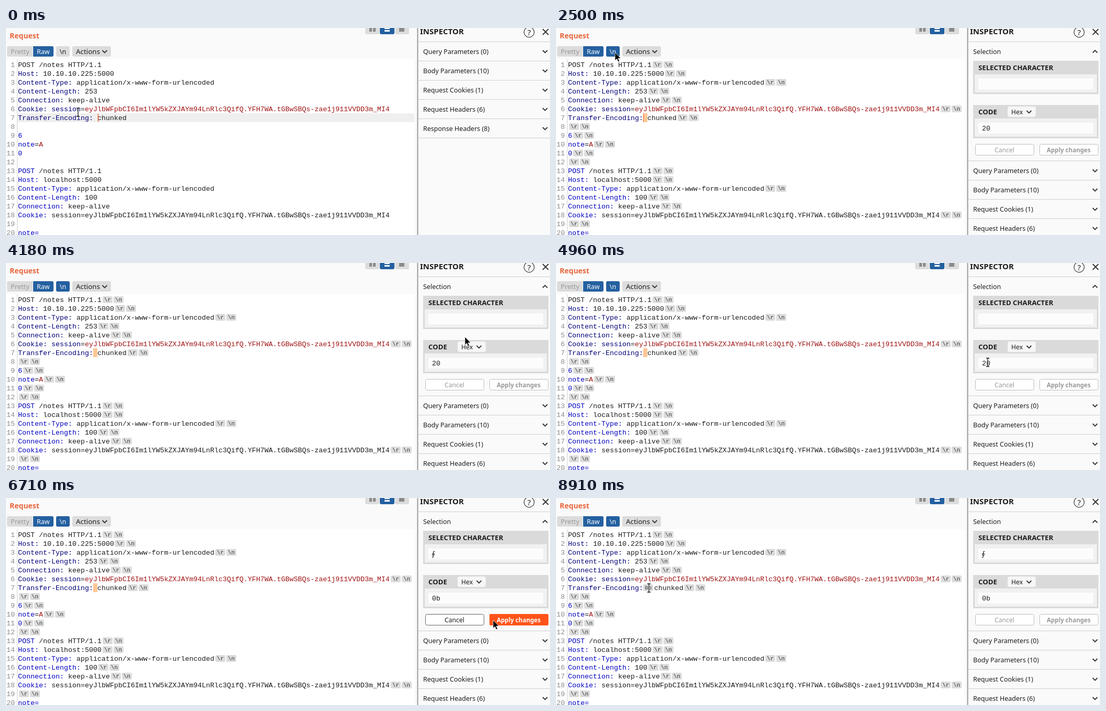
Write an HTML page that moves like this. It is 1042x398 px and loops after 9.01 s.

```html
<!DOCTYPE html>
<html lang="en">
<head>
<meta charset="utf-8">
<title>Request editor</title>
<style>
html, body { margin: 0; width: 100%; height: 100%; overflow: hidden; background: #fafafa; }
svg { display: block; width: 100vw; height: 100vh; }
text { font: 12.5px "Noto Sans", "Open Sans", sans-serif; fill: #1c1c1c; white-space: pre; }
.code text, .mono { font: 13.333px "Liberation Mono", "DejaVu Sans Mono", monospace; }
.code .num { fill: #8c8c8c; text-anchor: end; }
.code .tag { font-size: 11px; fill: #333; }
.code .head { fill: #000078; }
.code .body { fill: #0000c0; }
.code .value { fill: #a01414; }
.title { font-size: 14px; font-weight: 700; fill: #e8663c; }
.bold { font-weight: 700; font-size: 13.2px; }
.mid { text-anchor: middle; }
.chip { fill: #dcdcdc; }
.blue { fill: #2460a0; }
.white { fill: #fff; }
.dim { fill: #999; }
.small { font-size: 11.6px; font-weight: 700; }
.line { stroke: #cfcfcf; fill: none; }
.chev { fill: none; stroke: #333; stroke-width: 1.8; }

/* Hard switches: each keyframe holds until the next one */
.t { animation: 9.01s step-end infinite; }
@keyframes plain { 0% { opacity: 1 } 24.42%, 100% { opacity: 0 } }
@keyframes marked { 0% { opacity: 0 } 24.42%, 100% { opacity: 1 } }
@keyframes drop { 0% { transform: none } 24.42%, 100% { transform: translateY(229px) } }
@keyframes caret { 0% { opacity: 1 } 5.5%, 100% { opacity: 0 } }
@keyframes picked { 0% { opacity: 0 } 24.42% { opacity: 1 } 77.69%, 100% { opacity: 0 } }
@keyframes pickCaret { 0% { opacity: 0 } 24.42% { opacity: 1 } 29.9% { opacity: 0 } 33.8% { opacity: 1 } 39.4%, 100% { opacity: 0 } }
@keyframes tip { 0% { opacity: 0 } 32.19% { opacity: 1 } 37.18%, 100% { opacity: 0 } }
@keyframes oldCode { 0% { opacity: 1 } 57.7%, 100% { opacity: 0 } }
@keyframes firstKey { 0% { opacity: 0 } 57.7%, 100% { opacity: 1 } }
@keyframes secondKey { 0% { opacity: 0 } 59.93%, 100% { opacity: 1 } }
@keyframes fieldCaret { 0% { opacity: 0 } 59.93% { opacity: 1 } 65.15% { opacity: 0 } 69.9% { opacity: 1 } 73.8%, 100% { opacity: 0 } }
@keyframes enabled { 0% { opacity: 0 } 57.7% { opacity: 1 } 77.69%, 100% { opacity: 0 } }
@keyframes disabled { 0% { opacity: 1 } 57.7% { opacity: 0 } 77.69%, 100% { opacity: 1 } }
@keyframes hover { 0% { opacity: 0 } 70% { opacity: 1 } 77.69%, 100% { opacity: 0 } }
@keyframes applied { 0% { opacity: 0 } 77.69%, 100% { opacity: 1 } }
@keyframes push { 0% { transform: none } 77.69%, 100% { transform: translateX(13px) } }
@keyframes arrow { 0% { opacity: 0 } 12.2% { opacity: 1 } 52.9% { opacity: 0 } 61.5% { opacity: 1 } 82.6%, 100% { opacity: 0 } }
@keyframes beam { 0% { opacity: 1 } 12.2% { opacity: 0 } 52.9% { opacity: 1 } 61.5% { opacity: 0 } 82.6%, 100% { opacity: 1 } }

/* Pointer path, sampled about ten times a second */
.pointer { animation: path 9.01s steps(1) infinite; }
@keyframes path {
  0% { transform: translate(138px, 162px); animation-timing-function: steps(10) }
  11.1% { transform: translate(124px, 81px) }
  12.2% { transform: translate(122px, 63px); animation-timing-function: steps(7) }
  19.97% { transform: translate(118px, 47px); animation-timing-function: steps(2) }
  22.2% { transform: translate(113px, 47px) }
  33.84% { transform: translate(109px, 46px) }
  34.95% { transform: translate(254px, 41px); animation-timing-function: steps(3) }
  38.28% { transform: translate(880px, 72px) }
  39.4% { transform: translate(985px, 98px) }
  40.5% { transform: translate(1026px, 115px); animation-timing-function: steps(2) }
  43.05% { transform: translate(985px, 135px) }
  44.17% { transform: translate(938px, 141px); animation-timing-function: steps(2) }
  46.38% { transform: translate(879px, 142px); animation-timing-function: steps(7) }
  54.1% { transform: translate(827px, 191px) }
  60.9% { transform: translate(836px, 198px) }
  61.8% { transform: translate(870px, 217px) }
  62.9% { transform: translate(881px, 227px) }
  64% { transform: translate(889px, 234px) }
  65.1% { transform: translate(895px, 240px); animation-timing-function: steps(4) }
  69.9% { transform: translate(926px, 243px); animation-timing-function: steps(4) }
  74.4% { transform: translate(933px, 235px) }
  79.9% { transform: translate(925px, 236px); animation-timing-function: steps(4) }
  84.5% { transform: translate(510px, 230px) }
  85.65% { transform: translate(411px, 222px); animation-timing-function: steps(4) }
  90% { transform: translate(260px, 194px); animation-timing-function: steps(5) }
  94.75% { transform: translate(194px, 185px); animation-timing-function: steps(3) }
  98%, 100% { transform: translate(178px, 173px) }
}
</style>
</head>
<body>
<svg viewBox="0 0 1042 398" preserveAspectRatio="none">
  <rect class="white" y="60" width="782" height="338"/>
  <text class="title" x="7" y="20">Request</text>

  <!-- Layout switch -->
  <rect class="chip" x="688" y="-6" width="27" height="18" rx="3"/>
  <rect class="blue" x="716" y="-6" width="28" height="18" rx="3"/>
  <rect class="chip" x="745" y="-6" width="27" height="18" rx="3"/>
  <path fill="#8a8a8a" d="M696 0h5v7h-5zM703 0h5v7h-5zM753 0h10v7h-10z"/>
  <path class="white" d="M725 0h10v2h-10zM725 4h10v3h-10z"/>

  <!-- Toolbar -->
  <path class="chip" d="M51 35H5q-3 0-3 3V52q0 3 3 3H51z"/>
  <text class="dim" x="9" y="50" style="font-size:12.8px">Pretty</text>
  <path class="blue" d="M52 35H88q3 0 3 3V52q0 3-3 3H52z"/>
  <text class="white" x="59" y="50">Raw</text>
  <rect class="chip" x="96" y="35" width="26" height="20" rx="3"/>
  <text class="mid" x="109" y="50">\n</text>
  <g class="t" style="animation-name:marked">
    <rect class="blue" x="96" y="35" width="26" height="20" rx="3"/>
    <text class="white mid" x="109" y="50">\n</text>
  </g>
  <rect class="chip" x="127" y="35" width="74" height="20" rx="3"/>
  <text x="134" y="50" style="font-size:13.4px">Actions</text>
  <path class="chev" d="M184.5 43l4.5 4.5l4.5-4.5"/>

  <!-- Editor -->
  <rect class="t" style="animation-name:plain" x="22" y="164" width="760" height="17" fill="#efefef"/>
  <path class="line" d="M21.5 60V398"/>
  <g class="t" style="animation-name:picked">
    <rect x="167" y="164" width="8" height="17" fill="#ffc795"/>
    <path class="t" style="animation-name:pickCaret" d="M167.5 164v17" stroke="#e8663c"/>
  </g>
  <g id="editor" class="code"></g>
  <path class="t" style="animation-name:caret" d="M176.5 165v15" stroke="#f0643a" stroke-width="1.5"/>

  <!-- Inspector -->
  <path d="M788.5 0V398" stroke="#9a9a9a" stroke-width="2"/>
  <text class="bold" x="793" y="12" style="font-size:15px">INSPECTOR</text>
  <circle cx="1002" cy="8" r="9.8" fill="none" stroke="#333" stroke-width="1.2"/>
  <text class="mid" x="1002" y="13.5" style="font-size:15px">?</text>
  <path class="chev" d="M1028 2l11 11M1039 2l-11 11"/>
  <path class="line" d="M790 26.5H1042"/>
  <g id="sections" class="t" style="animation-name:drop"></g>

  <g class="t" style="animation-name:marked">
    <text x="799" y="50">Selection</text>
    <path class="chev" d="M1028 47.5l4.5-4.5l4.5 4.5"/>
    <g id="fields"></g>
    <text class="bold" x="809" y="81">SELECTED CHARACTER</text>
    <text class="bold" x="809" y="166">CODE</text>
    <rect x="865" y="151" width="54" height="20" rx="4" fill="#f6f6f6"/>
    <text x="872" y="166" style="font-size:12.2px">Hex</text>
    <path class="chev" d="M901.5 159l4.5 4.5l4.5-4.5"/>
    <text class="mono t" style="animation-name:secondKey" x="815" y="112">∮</text>
    <text class="mono t" style="animation-name:oldCode" x="816" y="197">20</text>
    <text class="mono t" style="animation-name:firstKey" x="816" y="197">0</text>
    <text class="mono t" style="animation-name:secondKey" x="824" y="197">b</text>
    <path class="t" style="animation-name:fieldCaret" d="M832.5 184v17" stroke="#111"/>

    <g class="t" style="animation-name:disabled">
      <rect x="803.5" y="223.5" width="112" height="21" rx="3" fill="#fff" stroke="#bdbdbd"/>
      <text class="dim mid" x="859" y="239" style="font-size:12.2px">Cancel</text>
      <rect x="926.5" y="223.5" width="112" height="21" rx="3" fill="#fff" stroke="#bdbdbd"/>
      <text class="dim mid small" x="982" y="239">Apply changes</text>
    </g>
    <g class="t" style="animation-name:enabled">
      <rect x="803.5" y="223.5" width="112" height="21" rx="3" fill="#fff" stroke="#666"/>
      <text class="mid" x="859" y="239" style="font-size:12.2px">Cancel</text>
      <rect x="926" y="223" width="113" height="22" rx="3" fill="#ff6633"/>
      <rect class="t" style="animation-name:hover" x="926" y="223" width="113" height="22" rx="3" fill="#ff5419"/>
      <text class="white mid small" x="982" y="239">Apply changes</text>
    </g>
  </g>

  <!-- Tooltip -->
  <g class="t" style="animation-name:tip">
    <rect x="115.5" y="73.5" width="160" height="23" fill="#ffc695" stroke="#5c5048"/>
    <text x="124" y="90" style="font-size:12.25px">Hide non-printable chars</text>
  </g>

  <g class="pointer">
    <path class="t" style="animation-name:arrow" d="M0 0V15.5L3.5 12.2L6 18L8.6 16.9L6.1 11.3H11z" fill="#000" stroke="#fff" stroke-width=".8"/>
    <g class="t" style="animation-name:beam" fill="none">
      <path d="M-3-8H3M0-8V8M-3 8H3" stroke="#fff" stroke-opacity=".7" stroke-width="3"/>
      <path d="M-3-8H3M0-8V8M-3 8H3" stroke="#111" stroke-width="1.3"/>
    </g>
  </g>
</svg>
<script>
const CELL = 8, LEFT = 23, ROW = 17, TOP = 62;
const token = 'eyJlbWFpbCI6Im1lYW5kZXJAYm94LnRlc3QifQ.YFH7WA.tGBwSBQs-zae1j911VVDD3m_MI4';
const form = 'application/x-www-form-urlencoded';

// Each row lists pairs of class and text
const rows = [
  ['', 'POST /notes HTTP/1.1'],
  ['head', 'Host: ', '', '10.10.10.225:5000'],
  ['head', 'Content-Type: ', '', form],
  ['head', 'Content-Length: ', '', '253'],
  ['head', 'Connection: ', '', 'keep-alive'],
  ['head', 'Cookie: session', '', '=', 'value', token],
  ['head', 'Transfer-Encoding: '],
  [],
  ['body', '6'],
  ['body', 'note', '', '=', 'value', 'A'],
  ['body', '0'],
  [],
  ['body', 'POST', '', ' /notes HTTP/1.1'],
  ['body', 'Host: ', '', 'localhost:5000'],
  ['body', 'Content-Type: ', '', form],
  ['body', 'Content-Length: ', '', '100'],
  ['body', 'Connection: ', '', 'keep-alive'],
  ['body', 'Cookie: ', '', 'session=' + token],
  [],
  ['body', 'note=']
];

const rowTop = i => TOP + i * ROW;
const label = (x, y, s, cls = '') => `<text class="${cls}" x="${x}" y="${y}">${s}</text>`;
const timed = (name, inner) => `<g class="t" style="animation-name:${name}">${inner}</g>`;
const tag = (x, y, s) =>
  `<rect class="chip" x="${x}" y="${y + 2}" width="19" height="13" rx="2"/>` + label(x + 3, y + 12, s, 'tag');
const lineEnd = (x, y) => timed('marked', tag(x + 2, y, '\\r') + tag(x + 23, y, '\\n'));

function drawRow(parts, i) {
  const y = rowTop(i);
  let x = LEFT, out = label(17, y + 13, i + 1, 'num');
  for (let k = 0; k < parts.length; k += 2) {
    out += label(x, y + 13, parts[k + 1], parts[k]);
    x += parts[k + 1].length * CELL;
  }
  if (i === 6) {
    const word = 'chunked';
    out += timed('applied', tag(x - CELL, y, '0b'));
    return out + timed('push', label(x, y + 13, word) + lineEnd(x + word.length * CELL, y));
  }
  return i < rows.length - 1 ? out + lineEnd(x, y) : out;
}

const sections = ['Query Parameters (0)', 'Body Parameters (10)', 'Request Cookies (1)',
  'Request Headers (6)', 'Response Headers (8)'];

const drawSection = (name, i) => {
  const y = 26 + i * 37;
  return label(799, y + 24, name) +
    `<path class="chev" d="M1028 ${y + 17}l4.5 4.5l4.5-4.5"/>` +
    `<path class="line" d="M790 ${y + 0.5}H1042M790 ${y + 37.5}H1042"/>`;
};

const drawField = y =>
  `<rect x="800.5" y="${y + 1.5}" width="237" height="61" fill="#f1f1f1" stroke="#d9d9d9" stroke-width="3"/>` +
  `<rect x="799" y="${y}" width="240" height="26" fill="#dadada"/>` +
  `<rect x="809" y="${y + 34}" width="220" height="21" fill="#fcfcfc"/>`;

const fill = (id, html) => { document.getElementById(id).innerHTML = html; };
fill('editor', rows.map(drawRow).join(''));
fill('sections', sections.map(drawSection).join(''));
fill('fields', [63, 148].map(drawField).join(''));
</script>
</body>
</html>
```
